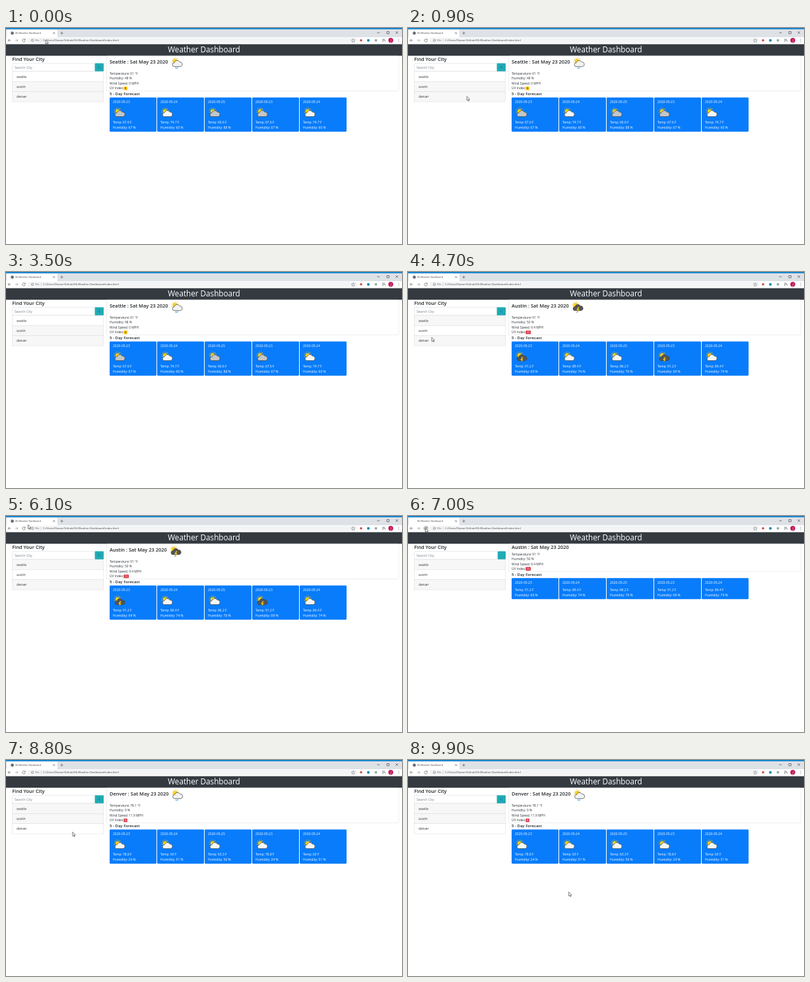
Animation of 600 by 328 pixels, one loop 10000 ms. Source, as an HTML page:

```html
<!DOCTYPE html>
<html lang="en">
<head>
<meta charset="utf-8">
<title>Weather Dashboard</title>
<style>
html, body { margin: 0; width: 100%; height: 100%; overflow: hidden; background: #fff }
svg { display: block; font-family: "Open Sans", "Noto Sans", sans-serif }
</style>
</head>
<body>
<svg id="stage" width="600" height="328" viewBox="0 0 600 328">
  <g id="chrome"></g>
  <g id="page"></g>
  <path id="arrow" d="M0 0V6.2L1.5 4.9 2.5 7.2 3.5 6.8 2.5 4.6H4.4Z" fill="#fff" stroke="#333" stroke-width=".6"/>
  <path id="beam" d="M-1-3H1M0-3V3M-1 3H1" fill="none" stroke="#aaa" stroke-width=".6"/>
</svg>
<script>
const $ = id => document.getElementById(id);
const text = (x, y, s, size = 4.8, fill = '#30353a', extra = '') =>
  `<text x="${x}" y="${y}" font-size="${size}" fill="${fill}" ${extra}>${s}</text>`;
const rect = (x, y, w, h, fill, extra = '') =>
  `<rect x="${x}" y="${y}" width="${w}" height="${h}" fill="${fill}" ${extra}/>`;
const dot = (x, y, r, fill, extra = '') =>
  `<circle cx="${x}" cy="${y}" r="${r}" fill="${fill}" ${extra}/>`;
const line = (d, color = '#5f6368', w = .7) =>
  `<path d="${d}" fill="none" stroke="${color}" stroke-width="${w}"/>`;
const bold = 'font-weight="600"', mid = 'text-anchor="middle"';

const cities = {
  Seattle: { now: [61, 48, 0], uv: 5, badge: '#ffc107', ink: '#222', icon: 'rain',
    temp: [67.6, 74.7, 60.6], hum: [67, 60, 88], sky: ['grey', 'white', 'grey'], iconX: 249 },
  Austin: { now: [91, 50, 9.4], uv: 11, badge: '#dc3545', ink: '#fff', icon: 'storm',
    temp: [91.2, 89.4, 86.2], hum: [69, 74, 76], sky: ['storm', 'white', 'white'], iconX: 247 },
  Denver: { now: [78.1, 9, 11.9], uv: 9, badge: '#dc3545', ink: '#fff', icon: 'rain',
    temp: [78.8, 63, 63.3], hum: [24, 51, 56], sky: ['white', 'white', 'white'], iconX: 249.5 }
};

function icon(kind, x, y) {
  const fill = { rain: '#f2f2f2', white: '#f6f6f6', grey: '#c4c6c8', storm: '#555' }[kind];
  let s = dot(7.2, 7.2, 4.9, 'none', 'stroke="#f0c419" stroke-width="1.3" stroke-dasharray=".9 1.66"') +
    dot(7.2, 7.2, 3.3, '#ffd91c', 'stroke="#a88b20" stroke-width=".4"') +
    `<path d="M6 15.3a2.9 2.9 0 0 1 0-5.8a4.3 4.3 0 0 1 8-1.2a3.6 3.6 0 0 1 1.6 7Z" fill="${fill}" stroke="#444" stroke-width=".7"/>`;
  if (kind == 'rain') s += line('M8.5 16.3l-.8 2M11.3 16.3l-.8 2M9.6 17.3l-.5 1.3', '#2b8fd0', .9);
  if (kind == 'storm') s += '<path d="M10.5 10L8 14.8h2.2L8.6 19l4.6-5.7h-2.4L13 10Z" fill="#ffd21c" stroke="#333" stroke-width=".3"/>';
  return `<g transform="translate(${x} ${y})">${s}</g>`;
}

function drawChrome(loading, hover) {
  let s = rect(0, 0, 600, 14, '#dee1e6') + rect(0, 0, 600, 2, '#1b87cf') +
    '<path d="M1 14V4q0-1.6 1.6-1.6H76q1.8 0 1.8 1.6V14Z" fill="#fff"/>' +
    text(14, 9.2, '06-Weather Dashboard', 3.6, '#3c4043') +
    line('M71.3 6.3l2.8 2.8m0-2.8l-2.8 2.8M84.5 5.6v4.4M82.3 7.8h4.4') +
    line('M562.3 7.2h4M577 5.4h3.4v3.4H577ZM590.4 5.2l3.6 3.6m0-3.6l-3.6 3.6', '#333', .6);
  if (!loading) s += dot(9.5, 7.8, 2.3, '#4d5156') + line('M7.7 7.2l1.7.8 1.5-1.4', '#fff', .5);
  s += rect(0, 14, 600, 10.6, '#fff') + rect(32.5, 14.8, 500, 8, '#f3f4f5', 'rx="4"');
  if (hover) s += dot(27, 18.8, 4.2, '#dfe1e4');
  s += line('M7.4 18.8H3.2M5.2 16.8l-2 2 2 2') +
    line('M13.8 18.8H18M16 16.8l2 2-2 2', '#9a9da1') +
    line('M28.6 17.3a2.2 2.2 0 1 0 .6 2M29.2 16.3v1.8h-1.8') +
    dot(40, 18.8, 1.8, 'none', 'stroke="#5f6368" stroke-width=".5"') +
    line('M40 18.4v1.4M40 17.5v.4', '#5f6368', .5) +
    text(44.2, 20.4, 'File', 4, '#5f6368') + line('M53.3 16.6v4.4', '#aaa', .4) +
    text(56.2, 20.4, 'C:/Users/Owner/Github/06-Weather-Dashboard/index.html', 4.16, '#3c4043') +
    line('M526 16.2l.8 1.8 2 .2-1.5 1.3.4 2-1.7-1-1.7 1 .4-2-1.5-1.3 2-.2Z', '#5f6368', .5) +
    dot(538, 18.8, 1.8, '#d9483b') + dot(549, 18.8, 2.1, '#168db5') +
    dot(560.5, 18.8, 2, '#9caaa5') +
    line('M570 17h4M570 18.7h4M570 20.4h2M574.6 18.5v2.2') +
    dot(583, 18.8, 3.7, '#c2185b') + text(583, 20.5, 'J', 4.6, '#fff', mid) +
    [16.8, 18.8, 20.8].map(y => dot(595, y, .5, '#5f6368')).join('');
  $('chrome').innerHTML = s;
}

function drawPage(name, loading) {
  const c = cities[name], up = loading ? 11.3 : 0, frame = 'stroke="#dcdcdc" stroke-width=".5"';
  let s = rect(0, 24.6, 600, 17.5, '#343a40') +
    text(300, 37.2, 'Weather Dashboard', 11.7, '#fff', mid + ' font-weight="500"') +
    text(9.4, 49.8, 'Find Your City', 7.4, '#212529', bold) +
    rect(9.6, 53.6, 126, 12.2, '#fff', 'rx="1.2" stroke="#ced4da" stroke-width=".5"') +
    text(13, 61.8, 'Search City', 5.2, '#7b838a') +
    (loading ? rect(136, 53.4, 12, 12.5, '#20abb5', 'rx="1"') :
      rect(134.6, 53.4, 13.4, 12.5, '#20abb5', 'rx="1"') +
      dot(141, 59.2, 1.6, 'none', 'stroke="#168089" stroke-width=".6"') + line('M142.2 60.4l1.6 1.6', '#168089', .6));

  Object.keys(cities).forEach((city, i) => {
    const y = 66 + i * 15.35;
    s += rect(9.6, y, 138.2, 15.35, city == name ? '#fff' : '#f7f7f7', frame) +
      text(16, y + 9.5, city.toLowerCase(), 4.75);
  });

  s += rect(152.5, 42.2, 442.7, 53.3 - up, 'none', 'rx="1.2" ' + frame) +
    text(157, loading ? 50.2 : 54.4, name + ' : Sat May 23 2020', 7.45, '#212529', bold);
  if (!loading) s += icon(c.icon, c.iconX, 43.3);
  const [t, h, w] = c.now;
  [`Temperature: ${t} °F`, `Humidity: ${h} %`, `Wind Speed: ${w} MPH`, 'UV Index:'].forEach((row, i) =>
    s += text(157, 70.8 - up + i * 7.55, row));
  const wide = c.uv > 9 ? 7.6 : 5.4;
  s += rect(178.4, 88.9 - up, wide, 5.4, c.badge, 'rx=".9"') +
    text(178.4 + wide / 2, 93.1 - up, c.uv, 4, c.ink, mid + ' ' + bold) +
    text(157, 101.9 - up, '5 - Day Forecast', 6, '#212529', bold);

  const top = 105.5 - up, drop = loading ? 20 : 39.5;
  for (let i = 0; i < 5; i++) {
    const x = 157 + i * 72, k = i % 3;
    s += rect(x, top, 71, loading ? 32 : 51.9, '#087cfa', 'rx="1.3"') +
      text(x + 5, top + 8.5, '2020-05-' + (23 + k), 4.95, '#fff');
    if (!loading) s += icon(c.sky[k], x + 5, 119.3);
    s += text(x + 5, top + drop, `Temp: ${c.temp[k]} F`, 4.85, '#fff') +
      text(x + 5, top + drop + 7.7, `Humidity: ${c.hum[k]} %`, 4.95, '#fff');
  }
  $('page').innerHTML = s;
}

// Pointer path: time, x, y
const path = [[0, 60, 18], [1100, 92, 112], [1700, 97, 122], [2300, 97, 122], [3400, 316, 34], [3500, 318, 33],
  [3800, 200, 226], [4100, 30, 103], [4500, 30, 103], [5200, 60, 84], [5400, 60, 84], [6100, 33.5, 13.2],
  [6400, 26.5, 18.5], [7100, 26.5, 18.5], [7800, 72, 94], [8000, 72, 96], [8200, 69, 89],
  [8500, 69, 89], [9600, 243.6, 200.4], [10000, 243.6, 200.4]];

function pointer(t) {
  const i = path.findIndex(p => p[0] > t), [t0, x0, y0] = path[i - 1], [t1, x1, y1] = path[i];
  const u = (t - t0) / (t1 - t0), e = u * u * (3 - 2 * u);
  return [x0 + (x1 - x0) * e, y0 + (y1 - y0) * e];
}

let last;
function tick() {
  const t = Math.floor(performance.now() % 10000 / 100) * 100;
  const name = t < 4400 ? 'Seattle' : t < 8400 ? 'Austin' : 'Denver';
  const loading = t >= 6800 && t < 7200, [x, y] = pointer(t);
  const hover = Math.hypot(x - 27, y - 19) < 4;
  const state = name + loading + hover;
  if (state != last) {
    drawChrome(loading, hover);
    drawPage(name, loading);
    last = state;
  }
  const onTitle = x > 244 && x < 356 && y > 26 && y < 41;
  for (const id of ['arrow', 'beam']) {
    $(id).setAttribute('transform', `translate(${x} ${y})`);
    $(id).style.display = (id == 'beam') == onTitle ? '' : 'none';
  }
  requestAnimationFrame(tick);
}
tick();
</script>
</body>
</html>
```
